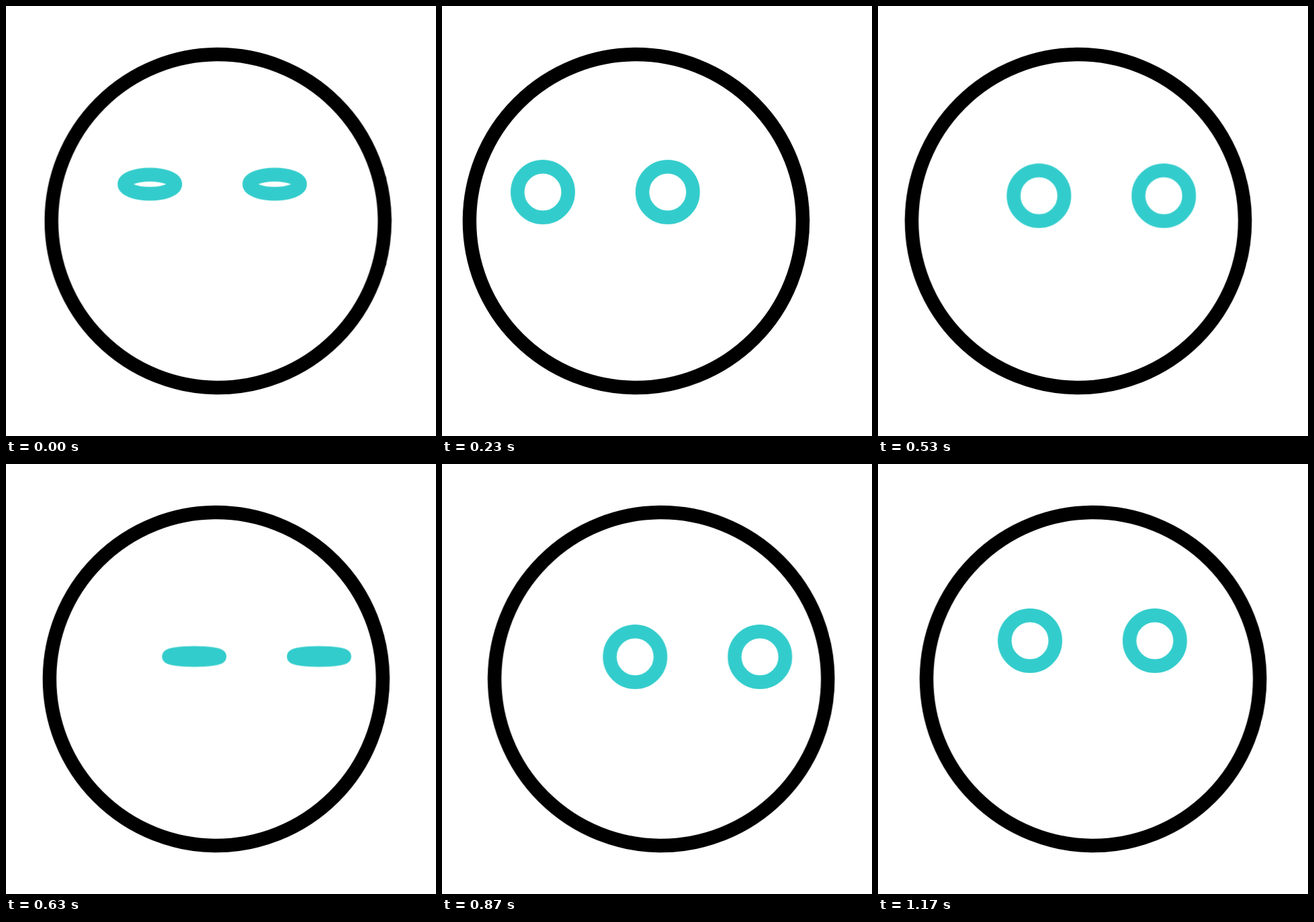
Write an HTML page without scripts that moves like this. It is 640 px wide and 640 px high and loops after 1670 ms.

```html
<!DOCTYPE html>
<html lang="en">
<head>
<meta charset="utf-8">
<title>Looking around</title>
<style>
  html, body { margin: 0; width: 100%; height: 100%; overflow: hidden; background: #fff; }
  svg { display: block; width: 100vw; height: 100vh; }
  circle, ellipse { fill: none; stroke-width: 20.5px; }
  .face, .eyes, .lift, ellipse {
    animation: 1670ms linear infinite;
    --soft: cubic-bezier(.333, 0, .667, 1);
  }
  .face { stroke: #000; animation-name: turn; }
  .eyes { stroke: #3cc; animation-name: look; }
  .lift { animation-name: lift; }
  ellipse { animation-name: blink; }

  /* head: left, pause, right, pause, back to rest */
  @keyframes turn {
    0% { transform: translateX(315.7px); animation-timing-function: cubic-bezier(.333, .25, .667, .627); }
    8% { transform: translateX(300.5px); animation-timing-function: cubic-bezier(.333, .487, .667, 1); }
    20% { transform: translateX(283.1px); }
    24% { transform: translateX(283.1px); animation-timing-function: cubic-bezier(.333, .2, .667, .58); }
    28% { transform: translateX(289.8px); }
    32% { transform: translateX(298.6px); }
    38% { transform: translateX(313.3px); }
    44%, 51% { transform: translateX(326.6px); }
    62% { transform: translateX(323.25px); }
    70%, 100% { transform: translateX(320.2px); }
  }
  @keyframes look {
    0% { transform: translateX(214.3px); animation-timing-function: cubic-bezier(.333, .26, .667, .64); }
    8% { transform: translateX(176.2px); animation-timing-function: cubic-bezier(.333, .53, .667, 1); }
    19.2% { transform: translateX(140px); }
    24% { transform: translateX(140px); animation-timing-function: var(--soft); }
    44.2% { transform: translateX(290.3px); }
    51% { transform: translateX(290.3px); animation-timing-function: var(--soft); }
    69.6%, 100% { transform: translateX(226.2px); }
  }
  @keyframes lift {
    0% { transform: translateY(265.2px); animation-timing-function: cubic-bezier(.333, .26, .667, .64); }
    8% { transform: translateY(272px); animation-timing-function: cubic-bezier(.333, .53, .667, 1); }
    19.2% { transform: translateY(278.8px); }
    24% { transform: translateY(278.8px); animation-timing-function: cubic-bezier(.333, 0, .667, .7); }
    38% { transform: translateY(286.6px); animation-timing-function: cubic-bezier(.333, .6, .667, 1); }
    44.2% { transform: translateY(288.1px); }
    51% { transform: translateY(288.1px); animation-timing-function: var(--soft); }
    69.6%, 100% { transform: translateY(263px); }
  }
  @keyframes blink {
    0% { ry: 14.8px; animation-timing-function: ease-out; }
    1.6% { ry: 5px; animation-timing-function: var(--soft); }
    5.6% { ry: 37.7px; }
    33.8% { ry: 37.7px; animation-timing-function: var(--soft); }
    38% { ry: 5.2px; animation-timing-function: var(--soft); }
    42%, 100% { ry: 37.7px; }
  }
</style>
</head>
<body>
<svg viewBox="0 0 640 640">
  <circle class="face" cy="320" r="248"/>
  <g class="eyes">
    <g class="lift">
      <ellipse rx="37.7" ry="37.7"/>
      <ellipse cx="185.8" rx="37.7" ry="37.7"/>
    </g>
  </g>
</svg>
</body>
</html>
```
